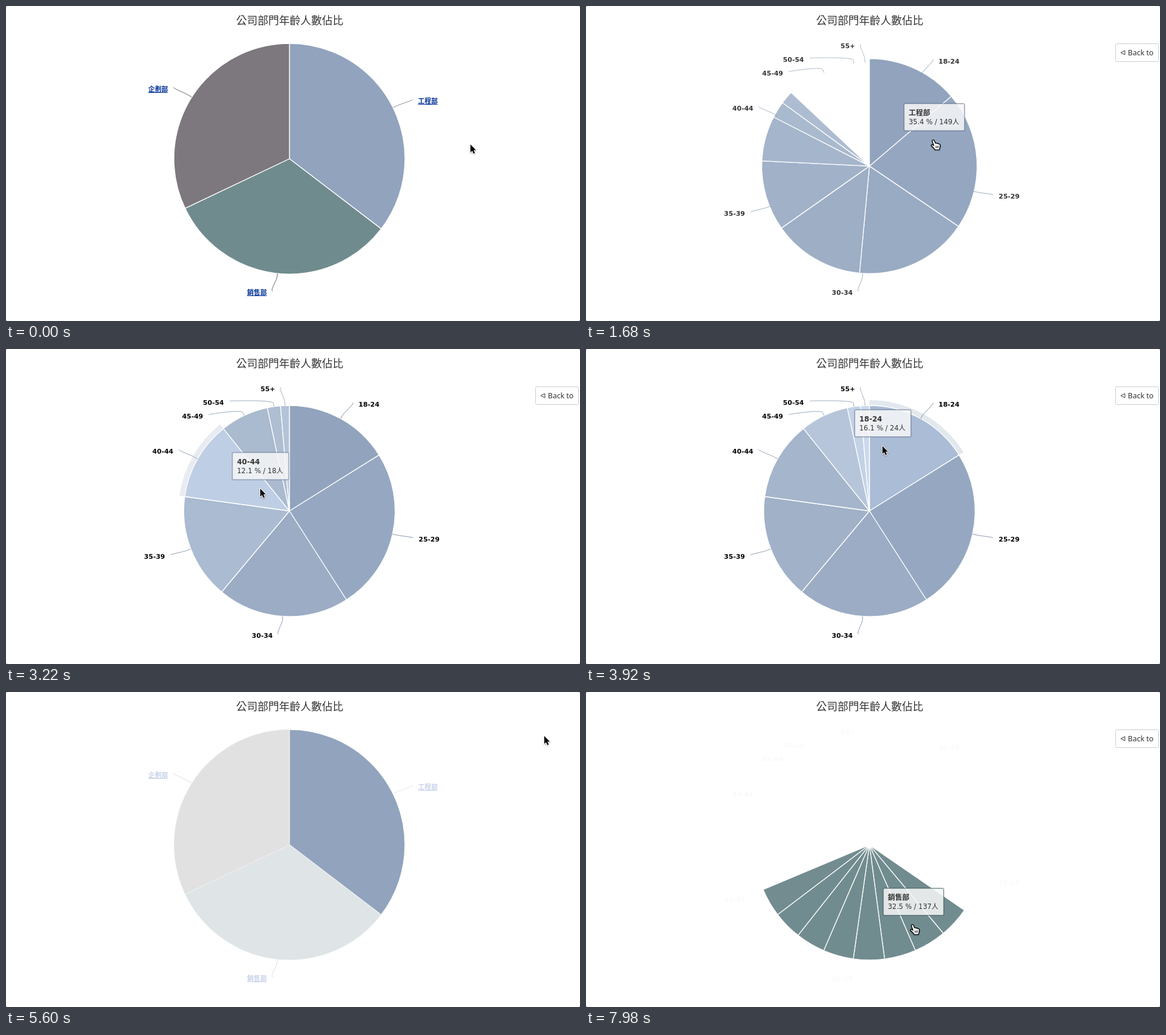
An HTML page with a canvas that plays this animation: 964 by 530 pixels, repeating every 8000 ms.

```html
<!DOCTYPE html>
<html lang="zh-Hant">
<head>
<meta charset="utf-8">
<title>Drilldown pie</title>
<style>
html, body { margin: 0; overflow: hidden; background: #fff; }
canvas { display: block; }
</style>
</head>
<body>
<canvas id="stage" width="964" height="530"></canvas>
<script>
const ctx = document.getElementById('stage').getContext('2d');
const TAU = Math.PI * 2, CX = 476;
const FONT = '"DejaVu Sans", "Noto Sans CJK TC", "Noto Sans CJK", sans-serif';
const CJK = '"Noto Sans CJK TC", "Noto Sans CJK", sans-serif';

// Timeline in ms
const LOOP = 8000, STEP = 70, ANIM = 500;
const DRILL = 1328, WAKE = 1900, UP = 5090, DRILL2 = 7932;

// Label columns: name, count, text edge x, text middle y
const TOP = {
  cy: 257, r: 194, link: true,
  rows: [['工程部', 149, 692, 160], ['銷售部', 137, 438, 482], ['企劃部', 135, 272, 139.5]],
  colors: [[145, 163, 189], [112, 139, 142], [124, 120, 125]],
  lines: ['#888', '#666', '#666']
};
const AGES = {
  cy: 272.5, r: 177.5,
  rows: [['18-24', 24, 592, 93], ['25-29', 37, 693, 320], ['30-34', 30, 448, 482],
    ['35-39', 24, 267, 349], ['40-44', 18, 281, 172], ['45-49', 11, 331, 113],
    ['50-54', 3, 366, 90], ['55+', 2, 452, 67]]
};
for (const pie of [TOP, AGES]) {
  pie.total = pie.rows.reduce((sum, row) => sum + row[1], 0);
  let sum = 0;
  pie.arcs = pie.rows.map(row => [sum / pie.total * TAU, (sum += row[1]) / pie.total * TAU]);
}
AGES.colors = AGES.rows.map((_, i) => TOP.colors[0].map((c, k) => c + i * [5, 4.5, 3.5][k]));
AGES.lines = AGES.colors.map(c => rgb(c, -20));

// Pointer path: time, x, y
const PATH = [
  [0, 780, 233], [140, 780, 233], [500, 690, 232], [900, 584, 225], [1900, 584, 225],
  [2200, 585, 290], [2450, 530, 365], [2700, 425, 355], [2820, 402, 310], [2950, 419, 264],
  [3220, 427, 235], [3500, 440, 190], [3750, 462, 150], [4000, 520, 170], [4250, 610, 165],
  [4500, 760, 115], [4830, 906, 70], [5000, 904, 74], [5800, 904, 74], [6150, 780, 250],
  [6440, 669, 412], [6700, 669, 412], [7000, 560, 395], [7150, 549, 391], [8000, 549, 391]
];
const ARROW = new Path2D('M0 0V13.2L3 10.4L5.2 15.2L7.5 14.2L5.3 9.5H9.3Z');
const HAND = new Path2D('M-2.6 2.2Q-2.4 .3 -.8 .3Q.6 .3 1.2 2L2.8 6Q4.8 5 5.9 6.6' +
  'Q7.8 5.8 8.7 7.5Q10.8 7.2 10.9 9.5Q11 13 9.2 17H2.2Q1 14.5 -1.6 12.5L-4 10' +
  'Q-4.2 7.8 -2 8.4L.2 10Z');
const KNUCKLES = new Path2D('M3.4 10.5L4 14M5.6 10.3L6 14M7.8 10L8 13.6');

function mix(a, b, p) { return a + (b - a) * p; }
function rgb(c, add = 0) { return `rgb(${c.map(v => Math.round(v + add)).join()})`; }
function ease(x) { return (1 - Math.cos(Math.PI * Math.min(1, Math.max(0, x)))) / 2; }

function tangent(i, k) {
  const a = PATH[i - 1], b = PATH[i], c = PATH[i + 1];
  if (!a || !c || (a[1] === b[1] && a[2] === b[2]) || (c[1] === b[1] && c[2] === b[2])) return 0;
  return (c[k] - a[k]) / (c[0] - a[0]);
}

function pointer(t) {
  const i = PATH.findIndex((_, n) => t < PATH[n + 1][0]);
  const a = PATH[i], b = PATH[i + 1], h = b[0] - a[0], u = (t - a[0]) / h;
  return [1, 2].map(k => mix(a[k], b[k], u * u * (3 - 2 * u)) +
    h * u * (1 - u) * ((1 - u) * tangent(i, k) - u * tangent(i + 1, k)));
}

function pieAt(t) { return t >= WAKE && t < UP ? AGES : TOP; }

function hit(t) {
  const pie = pieAt(t), [x, y] = pointer(t), dx = x - CX, dy = y - pie.cy;
  if (Math.hypot(dx, dy) > pie.r) return -1;
  const a = (Math.atan2(dx, -dy) + TAU) % TAU;
  return pie.arcs.findIndex(arc => a < arc[1]);
}

// Latest moment, within the span, at which the test held
function lastTime(t, span, test) {
  const from = Math.max(t - span, t >= UP ? UP + ANIM : t >= WAKE ? WAKE : 0);
  for (let s = t; s >= from; s -= 10) if (test(hit(s))) return s;
  return -1;
}

function slice(cy, r, [a, b], fill) {
  ctx.beginPath();
  ctx.moveTo(CX, cy);
  ctx.arc(CX, cy, r, a - TAU / 4, b - TAU / 4);
  ctx.closePath();
  ctx.fillStyle = fill;
  ctx.fill();
  ctx.strokeStyle = '#fff';
  ctx.lineWidth = 1.3;
  ctx.lineJoin = 'round';
  ctx.stroke();
}

function halo(pie, i) {
  const [a, b] = pie.arcs[i].map(v => v - TAU / 4);
  ctx.globalAlpha = .25;
  ctx.beginPath();
  ctx.arc(CX, pie.cy, pie.r + 9, a, b);
  ctx.arc(CX, pie.cy, pie.r, b, a, true);
  ctx.fillStyle = rgb(pie.colors[i]);
  ctx.fill();
  ctx.globalAlpha = 1;
}

function text(str, x, y, font, color, align = 'left') {
  ctx.font = font;
  ctx.fillStyle = color;
  ctx.textAlign = align;
  ctx.fillText(str, x, y);
}

function labels(pie, alpha) {
  ctx.globalAlpha = alpha;
  pie.rows.forEach(([name, , x, y], i) => {
    const right = x > CX, side = right ? -1 : 1, mid = (pie.arcs[i][0] + pie.arcs[i][1]) / 2;
    const at = d => [CX + Math.sin(mid) * (pie.r + d), pie.cy - Math.cos(mid) * (pie.r + d)];
    ctx.beginPath();
    ctx.moveTo(x + side * 10, y - 2.5);
    ctx.bezierCurveTo(x + side * 5, y - 2.5, ...at(12), ...at(6));
    ctx.lineTo(...at(0));
    ctx.strokeStyle = pie.lines[i];
    ctx.lineWidth = 1;
    ctx.stroke();
    const color = pie.link ? '#039' : '#000';
    text(name, x, y + 4, 'bold 11px ' + (pie.link ? CJK : FONT), color, right ? 'left' : 'right');
    if (pie.link) ctx.fillRect(right ? x : x - 33, Math.round(y + 5), 33, 1);
  });
  ctx.globalAlpha = 1;
}

function steadyPie(t, pie) {
  const now = hit(t);
  if (now >= 0) halo(pie, now);
  pie.arcs.forEach((arc, i) => {
    const seen = lastTime(t, ANIM, h => h === i);
    const glow = seen < 0 ? 0 : 1 - ease((t - seen) / ANIM);
    slice(pie.cy, pie.r, arc, rgb(pie.colors[i], 25 * glow));
  });
  labels(pie, 1);
}

// Age slices on their way between the parent's arc and the full circle
function movingPie(parent, p) {
  const [a, b] = TOP.arcs[parent], w = (b - a) / AGES.rows.length;
  AGES.arcs.forEach((arc, i) => {
    const ends = arc.map((v, k) => mix(a + (i + k) * w, v, p));
    const color = TOP.colors[parent].map((c, k) => mix(c, AGES.colors[i][k], p));
    slice(mix(TOP.cy, AGES.cy, p), mix(TOP.r, AGES.r, p), ends, rgb(color));
  });
}

function returningPie(t) {
  const fade = mix(.1, 1, ease((t - UP - 450) / 250));
  if (t < UP + ANIM) movingPie(0, 1 - ease((t - UP) / ANIM));
  if (t < UP + 450) return;
  TOP.arcs.forEach((arc, i) => {
    ctx.globalAlpha = i ? fade : 1;
    slice(TOP.cy, TOP.r, arc, rgb(TOP.colors[i]));
  });
  labels(TOP, fade);
}

function button(t) {
  const [x, y] = pointer(t);
  ctx.beginPath();
  ctx.roundRect(889.5, 63.5, 72, 30, 2);
  ctx.fillStyle = x > 889 && y > 63 && y < 94 ? '#e8e8e8' : '#fff';
  ctx.fill();
  ctx.strokeStyle = '#ccc';
  ctx.lineWidth = 1;
  ctx.stroke();
  ctx.beginPath();
  ctx.moveTo(905, 75);
  ctx.lineTo(898, 78.5);
  ctx.lineTo(905, 82);
  ctx.closePath();
  ctx.strokeStyle = '#333';
  ctx.stroke();
  text('Back to', 910, 83, '12.5px "Noto Sans", sans-serif', '#333');
}

function tooltip(t) {
  const held = t >= DRILL2 ? DRILL2 - 1 : t >= DRILL && t < WAKE ? DRILL - 1 : t;
  const seen = lastTime(held, 450, h => h >= 0);
  if (seen < 0) return;
  const pie = pieAt(seen), i = hit(seen), [mx, my] = pointer(seen), [name, count] = pie.rows[i];
  const line = `${(count / pie.total * 100).toFixed(1)} % / ${count}人`;
  const font = '11.5px ' + FONT;
  ctx.font = font;
  const w = Math.round(ctx.measureText(line).width) + 16;
  const x = Math.round(mx - w / 2) + .5, y = Math.round(my - 60) - .5;
  ctx.globalAlpha = Math.min(1, (450 - held + seen) / 100);
  ctx.beginPath();
  ctx.roundRect(x, y, w, 45, 2);
  ctx.save();
  ctx.translate(1, 1);
  ctx.strokeStyle = 'rgba(0,0,0,.12)';
  for (ctx.lineWidth = 3; ctx.lineWidth > 1; ctx.lineWidth--) ctx.stroke();
  ctx.restore();
  ctx.fillStyle = 'rgba(247,247,247,.85)';
  ctx.fill();
  ctx.strokeStyle = rgb(pie.colors[i]);
  ctx.lineWidth = 1;
  ctx.stroke();
  text(name, x + 7.5, y + 19.5, 'bold 12px ' + (pie.link ? CJK : FONT), '#333');
  text(line, x + 7.5, y + 34.5, font, '#333');
  ctx.globalAlpha = 1;
}

function cursor(t) {
  const isHand = t < WAKE || t >= UP + ANIM ? hit(t) >= 0 : false;
  ctx.save();
  ctx.translate(...pointer(t));
  ctx.lineJoin = 'round';
  ctx.shadowColor = 'rgba(0,0,0,.35)';
  ctx.shadowBlur = 2;
  ctx.shadowOffsetY = 1;
  ctx.lineWidth = isHand ? 1.2 : 2;
  ctx.strokeStyle = isHand ? '#000' : '#fff';
  ctx.fillStyle = isHand ? '#fff' : '#000';
  const shape = isHand ? HAND : ARROW;
  ctx.stroke(shape);
  ctx.shadowColor = 'transparent';
  ctx.fill(shape);
  if (isHand) {
    ctx.stroke(shape);
    ctx.lineWidth = .9;
    ctx.stroke(KNUCKLES);
  }
  ctx.restore();
}

function draw(t) {
  ctx.fillStyle = '#999';
  ctx.fillRect(0, 0, 964, 530);
  ctx.fillStyle = '#fff';
  ctx.beginPath();
  ctx.roundRect(0, 0, 964, 530, 3);
  ctx.fill();
  text('公司部門年齡人數佔比', CX + .5, 30.5, '18px ' + CJK, '#333', 'center');

  const start = t >= DRILL2 ? DRILL2 : DRILL;
  if (t >= DRILL2 || (t >= DRILL && t < WAKE)) {
    const p = ease((t - start) / ANIM);
    movingPie(t >= DRILL2 ? 1 : 0, p);
    labels(AGES, p);
  } else if (t >= UP && t < UP + 700) {
    returningPie(t);
  } else {
    steadyPie(t, pieAt(t));
  }
  if (t >= DRILL2 || (t >= DRILL && t < UP)) button(t);
  tooltip(t);
  cursor(t);
}

function tick(now) {
  draw(Math.floor(now % LOOP / STEP) * STEP);
  requestAnimationFrame(tick);
}
requestAnimationFrame(tick);
</script>
</body>
</html>
```
